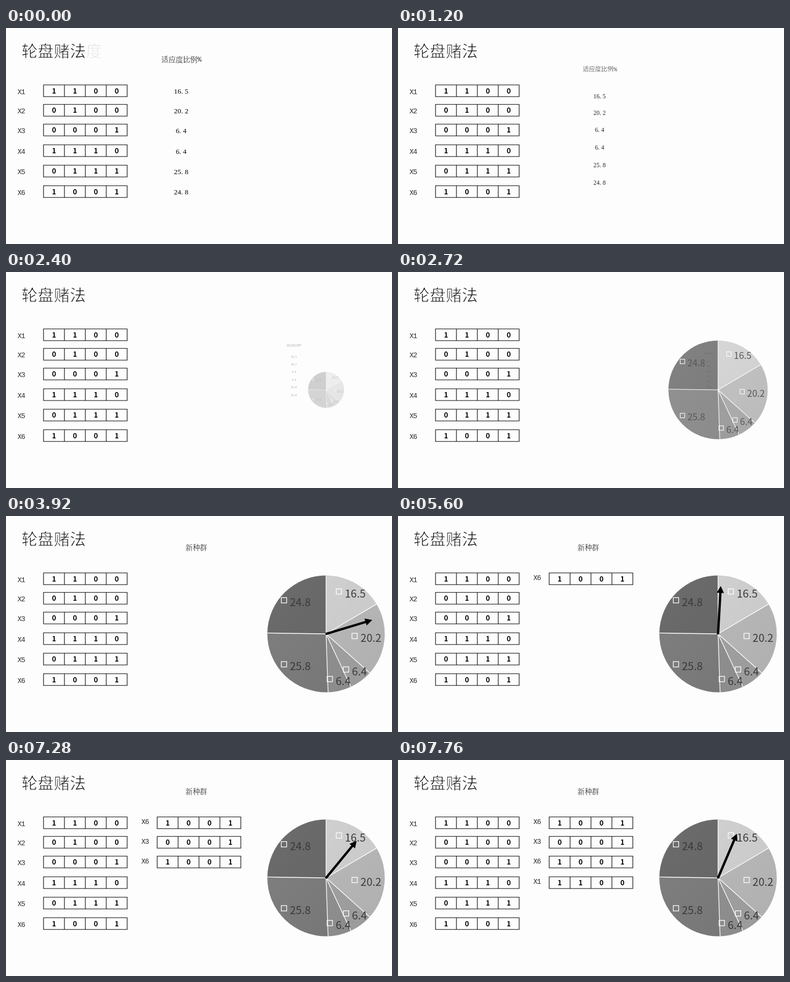
An HTML page that plays this animation: 720 by 405 pixels, repeating every 8 s.

```html
<!DOCTYPE html>
<html lang="zh">
<head>
<meta charset="utf-8">
<style>
html, body { margin: 0; width: 100%; height: 100%; overflow: hidden; background: #fdfdfd; }
svg { display: block; width: 720px; height: 405px; }
text { font-family: 'Noto Sans CJK SC', 'Noto Sans CJK', sans-serif; font-size: 13.4px; }
/* a background-coloured outline thins the strokes */
.title { font-size: 30px; stroke: #fdfdfd; stroke-width: .9; }
.heading { stroke: #fdfdfd; stroke-width: .3; }
.label { font: 13px 'Liberation Mono', monospace; fill: #2a2a2a; }
.number { font: 13.4px 'Liberation Serif', serif; }
.bit { font-weight: 700; font-size: 13px; text-anchor: middle; }
.share { font-size: 20px; fill: #3a3a3a; }
.grid { fill: none; stroke: #000; stroke-width: 1.1; }
.cut { fill: none; stroke: #fff; stroke-width: 1.3; }
</style>
</head>
<body>
<svg id="stage" viewBox="0 0 720 405"></svg>
<script>
const LOOP = 8000, PITCH = 6.7, CX = 597, CY = 221, R = 109.5;
const tops = [106.7, 143.3, 180.3, 219, 257.3, 295.7];
const genes = ['1100', '0100', '0001', '1110', '0111', '1001'];
const shares = ['16.5', '20.2', '6.4', '6.4', '25.8', '24.8'];
const greys = ['#d0d0d0', '#b8b8b8', '#a1a1a1', '#909090', '#7a7a7a', '#656565'];
const marks = [[621, 141.5], [650.3, 225], [634.3, 287.7], [604, 305.7], [518.5, 278], [518.5, 158]];
const picks = [5, 2, 5, 0];
// start time, first angle, last angle (clockwise from the top)
const spins = [[4541, 73.2, 713], [5567, 353, 503], [6447, 143, 348], [7247, 348, 1103]];
const SPIN_TIME = 500;

const clamp = v => Math.max(0, Math.min(1, v));
const ramp = (t, from, to) => clamp((t - from) / (to - from));

const text = (x, y, str, cls) => `<text x="${x}" y="${y}" class="${cls}">${str}</text>`;
const spaced = (x, y, str, cls) => text([...str].map((_, i) => x + i * PITCH).join(' '), y, str, cls);

function row(index, x, labelX, top, labelDrop) {
  const bits = [...genes[index]].map((b, i) => text(x + 19.5 + i * 39, top + 15.9, b, 'bit')).join('');
  return spaced(labelX, top + labelDrop, 'X' + (index + 1), 'label') + bits +
    `<path class="grid" d="M${x} ${top}h156v22h-156zm39 0v22m39 0v-22m39 0v22"/>`;
}

function pie() {
  const total = shares.reduce((sum, s) => sum + +s, 0);
  const rim = a => `${CX + R * Math.sin(a)} ${CY + R * -Math.cos(a)}`;
  let angle = 0, slices = '', cuts = '', labels = '';
  shares.forEach((share, i) => {
    const next = angle + share / total * 2 * Math.PI;
    const [x, y] = marks[i];
    slices += `<path fill="${greys[i]}" d="M${CX} ${CY}L${rim(angle)}A${R} ${R} 0 0 1 ${rim(next)}z"/>`;
    cuts += `M${CX} ${CY}L${rim(angle)}`;
    labels += `<rect class="cut" x="${x - 5}" y="${y - 5}" width="10" height="10"/>` +
      text(x + 11, y + 11, share, 'share');
    angle = next;
  });
  return slices + `<circle cx="${CX}" cy="${CY}" r="${R}" fill="url(#shade)"/>` +
    `<path class="cut" d="${cuts}"/>` + labels;
}

const column = text(290, 63.6, '适应度比例', 'heading') + spaced(357, 63.4, '%', 'label') +
  shares.map((s, i) => spaced(326.7 - s.length * PITCH / 2, tops[i] + 16.5, s, 'number')).join('');

const stage = document.getElementById('stage');
stage.innerHTML = `
  <linearGradient id="shade" x2="1" y2="1">
    <stop stop-color="#fff" stop-opacity=".05"/><stop offset="1" stop-opacity=".05"/>
  </linearGradient>
  <g id="oldTitle" opacity=".1">${text(29, 54, '计算适应度', 'title')}</g>
  ${text(29, 54, '轮盘赌法', 'title')}
  ${tops.map((top, i) => row(i, 70, 21.5, top, 17)).join('')}
  <g id="pie">${pie()}</g>
  <g id="column">${column}</g>
  <g id="heading">${text(335, 63.6, '新种群', 'heading')}</g>
  ${picks.map((p, i) => `<g id="pick${i}">${row(p, 282, 252.5, tops[i], 13.3)}</g>`).join('')}
  <path id="arrow" d="M-2.2 1V-77H-6.7L0-90L6.7-77H2.2V1z"/>`;

const el = id => document.getElementById(id);
const show = (id, on) => el(id).setAttribute('visibility', on ? 'visible' : 'hidden');

function zoom(id, x, y, scale, dx = 0) {
  el(id).setAttribute('transform', `translate(${x + dx} ${y}) scale(${scale}) translate(${-x} ${-y})`);
  el(id).setAttribute('opacity', scale);
}

function draw(t) {
  show('oldTitle', t < 80);
  const away = ramp(t, 833, 3349);
  zoom('column', 327, 184.5, 1 - away, 337 * away);
  zoom('pie', CX, CY, ramp(t, 2218, 2813));
  show('heading', t >= 3900);

  let angle = spins[0][1];
  spins.forEach(([start, from, to], i) => {
    if (t >= start) angle = from + (to - from) * ramp(t, start, start + SPIN_TIME);
    show('pick' + i, t >= start + SPIN_TIME);
  });
  el('arrow').setAttribute('transform', `translate(${CX} ${CY}) rotate(${angle})`);
  el('arrow').setAttribute('opacity', ramp(t, 2813, 3300));
}

function tick() {
  draw(performance.now() % LOOP);
  requestAnimationFrame(tick);
}
tick();
</script>
</body>
</html>
```
